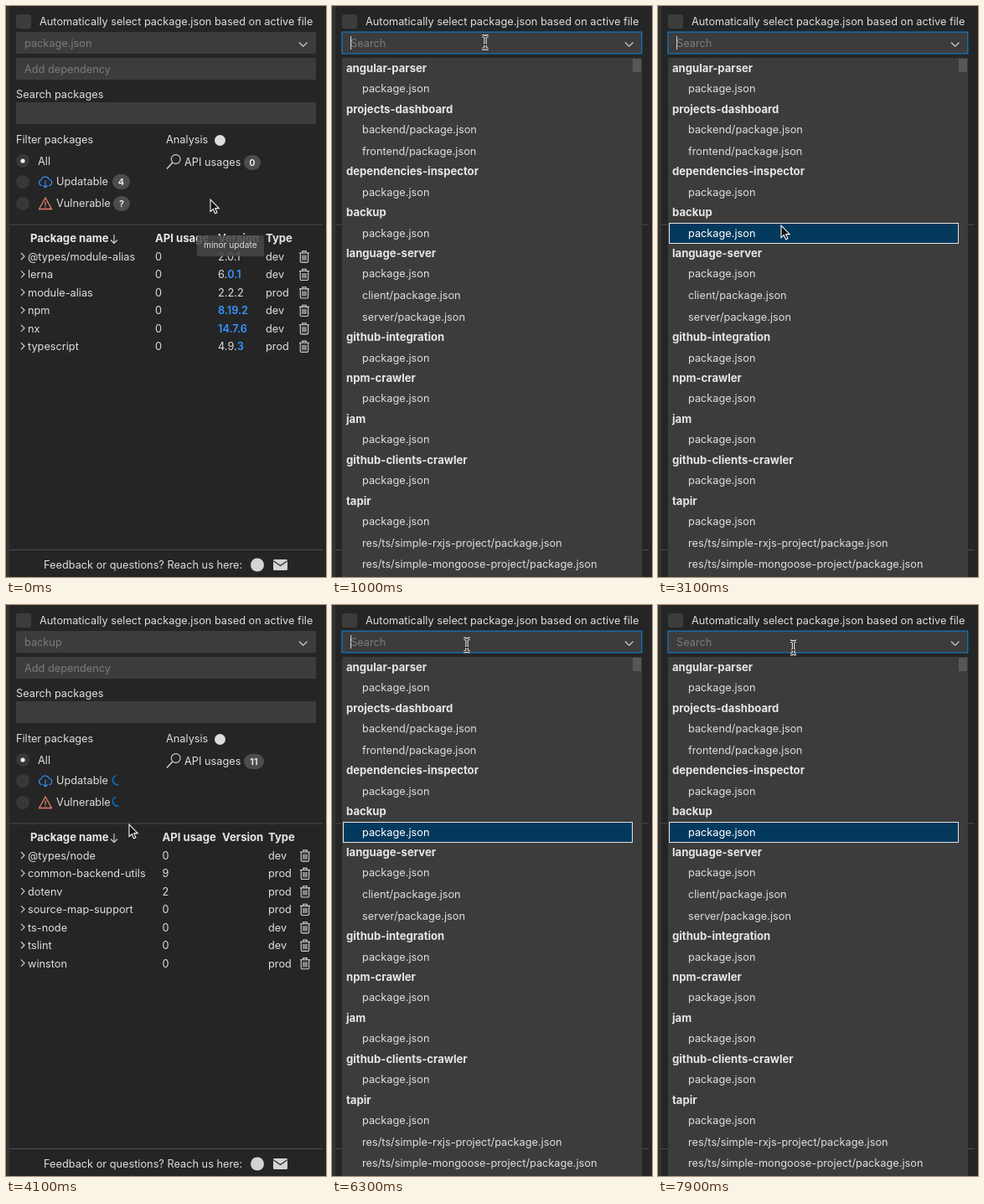
Write an HTML page that moves like this. It is 382 px wide and 682 px high and loops after 8000 ms.

```html
<!DOCTYPE html>
<html lang="en">
<head>
<meta charset="utf-8">
<title>Package manager panel</title>
<style>
  html, body { margin: 0; height: 100%; overflow: hidden; background: #252526; }
  svg { display: block; width: 100vw; height: 100vh; }
  text { font: 12.76px Inter, "Open Sans", sans-serif; fill: #dedede; white-space: pre; }
  .bold { font-size: 13.12px; font-weight: 700; fill: #e6e6e6; }
  .hint { fill: #7b7b7b; }
  .new { font-weight: 600; fill: #3794ff; }
  .badge { font-size: 11px; font-weight: 600; fill: #f2f2f2; text-anchor: middle; }
  .tip { font-size: 10.2px; fill: #dedede; }
  .line { fill: none; stroke: #d4d4d4; stroke-width: 1.1; }
  .picked { fill: #fff; }
</style>
</head>
<body>
<svg id="stage" viewBox="0 0 382 682"></svg>
<script>
const LOOP = 8000, FIELD = '#3c3c3c';
const FOCUS = [[800, 3200], [6100, 8000]];
const LIST = [[1000, 3200], [6100, 8000]];
const SWITCH = 3200, SPIN_START = 3130;

const text = (x, y, s, cls = '') => `<text x="${x}" y="${y}" class="${cls}">${s}</text>`;
const rect = (x, y, w, h, fill, extra = '') =>
  `<rect x="${x}" y="${y}" width="${w}" height="${h}" fill="${fill}" ${extra}/>`;
const line = (d, extra = '') => `<path class="line" d="${d}" ${extra}/>`;
const dot = (x, y, r, fill) => `<circle cx="${x}" cy="${y}" r="${r}" fill="${fill}"/>`;
const group = (id, body, extra = '') => `<g id="${id}" ${extra}>${body}</g>`;
const badge = (cx, cy, w, s) =>
  rect(cx - w / 2, cy - 9, w, 18, '#4d4d4d', 'rx="9"') + text(cx, cy + 4, s, 'badge');
const trash = (x, y) => `<g transform="translate(${x} ${y})">` +
  line('M-6 -4.5H6M-2.2 -4.5V-6.6H2.2V-4.5M-4.7 -4.5V5.2Q-4.7 6.6 -3.3 6.6H3.3Q4.7 6.6 4.7 5.2V-4.5M-2 -2V4.2M0 -2V4.2M2 -2V4.2') + '</g>';

function table(cols, rows) {
  const [usageX, versionX, typeX, trashX] = cols;
  const head = text(29, 282, 'Package name', 'bold') + line('M129 273V283.5M125 279.5L129 283.5L133 279.5') +
    text(usageX, 282, 'API usage', 'bold') + text(versionX, 282, 'Version', 'bold') + text(typeX, 282, 'Type', 'bold');
  return head + rows.map(([name, usage, type, old = '', fresh = ''], i) => {
    const y = 304 + 21.45 * i;
    return line(`M18 ${y - 9}l4 4l-4 4`) + text(26, y, name) + text(usageX, y, usage) +
      text(versionX, y, `${old}<tspan class="new">${fresh}</tspan>`) + text(typeX, y, type) + trash(trashX, y - 4.5);
  }).join('');
}

const firstTable = table([178, 253, 310, 356], [
  ['@types/module-alias', 0, 'dev', '2.0.1'],
  ['lerna', 0, 'dev', '6.', '0.1'],
  ['module-alias', 0, 'prod', '2.2.2'],
  ['npm', 0, 'dev', '', '8.19.2'],
  ['nx', 0, 'dev', '', '14.7.6'],
  ['typescript', 0, 'prod', '4.9.', '3']
]);
const secondTable = table([186.5, 258, 313, 357], [
  ['@types/node', 0, 'dev'],
  ['common-backend-utils', 9, 'prod'],
  ['dotenv', 2, 'prod'],
  ['source-map-support', 0, 'prod'],
  ['ts-node', 0, 'dev'],
  ['tslint', 0, 'dev'],
  ['winston', 0, 'prod']
]);

const file = 'package.json';
const projects = [
  ['angular-parser', file],
  ['projects-dashboard', 'backend/' + file, 'frontend/' + file],
  ['dependencies-inspector', file],
  ['backup', file],
  ['language-server', file, 'client/' + file, 'server/' + file],
  ['github-integration', file],
  ['npm-crawler', file],
  ['jam', file],
  ['github-clients-crawler', file],
  ['tapir', file, 'res/ts/simple-rxjs-project/' + file, 'res/ts/simple-mongoose-project/' + file]
];
const options = [];
let titles = '', rowY = 74.5;
for (const [title, ...files] of projects) {
  titles += text(17, rowY + 4.5, title, 'bold');
  files.forEach((label, i) => {
    rowY += i ? 25.6 : 24.2;
    options.push({ label, y: rowY });
  });
  rowY += 24.7;
}
const chosen = options[4];

const base =
  rect(0, 0, 382, 682, '#252526') + rect(0, 0, 4, 682, '#333') +
  rect(12, 10, 18, 17, FIELD, 'rx="3"') + text(40, 23, 'Automatically select package.json based on active file') +
  rect(12, 31, 358, 26, FIELD) + rect(12, 62, 358, 26, FIELD) + text(22, 80, 'Add dependency', 'hint') +
  text(12, 110, 'Search packages') + rect(12, 115, 358, 26, FIELD) +
  text(12, 164, 'Filter packages') + text(191, 164, 'Analysis') + dot(255.5, 160.5, 6.5, '#dcdcdc') +
  [185, 210, 236].map(y => dot(20, y, 8, '#383838')).join('') + dot(20, 185, 2.6, '#f0f0f0') +
  text(38, 190, 'All') + text(60, 214, 'Updatable') + text(60, 240, 'Vulnerable') +
  line('M43 214.5H42.5A3.5 3.5 0 0 1 42 207.7A5 5 0 0 1 51.4 207A3.8 3.8 0 0 1 51.5 214.5H51M47 208.5V217M44.3 214.4L47 217L49.7 214.4', 'style="stroke:#3794ff"') +
  line('M47 229L54.5 242.5H39.5ZM47 233.5V238.5M47 239.7V241', 'style="stroke:#e8806b;stroke-width:1.3"') +
  line('M198.8 187L192 194.5', 'style="stroke-width:1.4"') + '<circle class="line" cx="202.7" cy="183" r="5.4"/>' +
  text(213, 191, 'API usages') +
  rect(4, 260.5, 374, 1, '#4c4c4c') + rect(4, 649, 374, 1, '#4c4c4c') +
  text(45, 672, 'Feedback or questions? Reach us here:') + dot(300, 667.5, 8, '#d4d4d4') +
  rect(319, 661, 17, 13, '#d4d4d4', 'rx="1.5"') + line('M319.5 663L327.5 668.5L335.5 663', 'style="stroke:#252526"');

const ring = y => `<circle class="ring" cx="133" cy="${y}" r="5.6" fill="none" stroke="#0e70c0" stroke-width="1.6" pathLength="360"/>`;

const stage = document.getElementById('stage');
stage.innerHTML = base +
  group('before', firstTable + badge(137.5, 210, 21, '4') + badge(138, 236, 20, '?') + badge(294, 187, 20, '0')) +
  group('after', secondTable + badge(296, 187, 24, '11') + ring(209) + ring(234.5)) +
  group('tooltip', rect(228, 274, 80, 25, '#484848', 'rx="2" fill-opacity=".86"') + text(236, 289, 'minor update', 'tip')) +
  '<text id="value" class="hint" x="22" y="49"></text>' +
  line('M350 43.5L354.7 48.2L359.5 43.5') +
  group('focus', rect(11.8, 31.1, 358, 25.8, 'none', 'stroke="#0e7fd0" stroke-width="1.1"')) +
  group('caret', rect(22, 36, 1, 16, '#dcdcdc')) +
  group('list', rect(12, 62, 358, 620, FIELD) + rect(359, 63, 10, 16, '#575757') +
    rect(13.5, 0, 345, 24, '#04395e', 'id="mark" stroke="#e4e4e4"') + titles +
    options.map(o => text(36, o.y + 4.5, o.label, 'option')).join('')) +
  group('arrow', '<path d="M0 0V14.6L3.3 11.5L5.6 16.8L8 15.8L5.7 10.6H10.2Z" fill="#111" stroke="#f4f4f4" stroke-width="1.1"/>') +
  group('beam', ['#f4f4f4" stroke-width="3.2', '#111" stroke-width="1.1'].map(ink =>
    `<path d="M-3.5 -7.8Q0 -7.8 0 -5.5Q0 -7.8 3.5 -7.8M0 -6V6M-3.5 7.8Q0 7.8 0 5.5Q0 7.8 3.5 7.8M-2 2.6H2" fill="none" stroke="${ink}"/>`).join('')) +
  group('hand', '<path d="M-1.5 1Q0 -1 1.5 1L2.4 5Q4 3.8 4.8 5.2Q6.3 4.4 7 5.8Q8.8 5.2 9 7.4V10.5L7.5 15H0.5L-4.2 9.2Q-4.4 7 -2.2 7.6L-0.4 9.2Z" fill="#f4f4f4" stroke="#111"/><path d="M3 10V13M5.2 10V13" stroke="#111" stroke-width=".8"/>');

const el = id => document.getElementById(id);
const show = (id, on) => el(id).style.display = on ? '' : 'none';
const active = (spans, t) => spans.find(([from, to]) => t >= from && t < to);
const optionTexts = [...document.querySelectorAll('.option')];
const rings = [...document.querySelectorAll('.ring')];

// time, x, y
const path = [
  [0, 244, 231], [100, 244, 231], [700, 184, 44], [1000, 183, 43.5], [1700, 183, 43.5],
  [2500, 155, 230], [2600, 155, 230], [2800, 147, 262], [4700, 147, 262],
  [5400, 157, 98], [5900, 161, 48], [7800, 161, 48], [7900, 161.5, 51], [8000, 161.5, 51]
];

function pointer(t) {
  const i = path.findIndex(p => p[0] > t);
  const [t0, x0, y0] = path[i - 1], [t1, x1, y1] = path[i];
  const u = (t - t0) / (t1 - t0), k = u * u * (3 - 2 * u);
  return [x0 + (x1 - x0) * k, y0 + (y1 - y0) * k];
}

function pointerShape(y, focused, listed) {
  if (y > 30 && y < 58) return focused ? 'beam' : 'hand';
  if (listed) return 'arrow';
  if (y > 62 && y < 88 || y > 97 && y < 113) return 'hand';
  return y > 115 && y < 141 ? 'beam' : 'arrow';
}

function draw(t) {
  const focused = active(FOCUS, t), listed = active(LIST, t), switched = t >= SWITCH;
  const [x, y] = pointer(t);

  show('before', !switched);
  show('after', switched);
  el('tooltip').style.opacity = Math.max(0, 1 - t / 200);
  el('value').textContent = focused ? 'Search' : switched ? 'backup' : file;
  show('focus', focused);
  show('caret', focused && Math.floor((t - focused[0]) / 500) % 2 === 0);

  show('list', listed);
  const marked = switched ? chosen : options.find(o => Math.abs(o.y - y - 4) < 12.3);
  show('mark', marked);
  if (marked) el('mark').setAttribute('y', Math.round(marked.y - 12) + 0.5);
  optionTexts.forEach((node, i) => node.classList.toggle('picked', options[i] === marked));

  const p = (t - SPIN_START + LOOP) % 2000 / 2000;
  const turn = p < 0.5 ? 900 * p : 450 + 1260 * (p - 0.5);
  const arc = p < 0.5 ? 360 * p : 360 * (1 - p);
  for (const r of rings) {
    r.setAttribute('stroke-dasharray', `${arc} ${360 - arc}`);
    r.setAttribute('transform', `rotate(${turn} 133 ${r.getAttribute('cy')})`);
  }

  const shape = pointerShape(y, focused, listed);
  for (const id of ['arrow', 'beam', 'hand']) {
    show(id, id === shape);
    el(id).setAttribute('transform', `translate(${x} ${y})`);
  }
}

const start = performance.now();
function tick() {
  draw(Math.floor((performance.now() - start) % LOOP / 100) * 100);
  requestAnimationFrame(tick);
}
tick();
</script>
</body>
</html>
```
